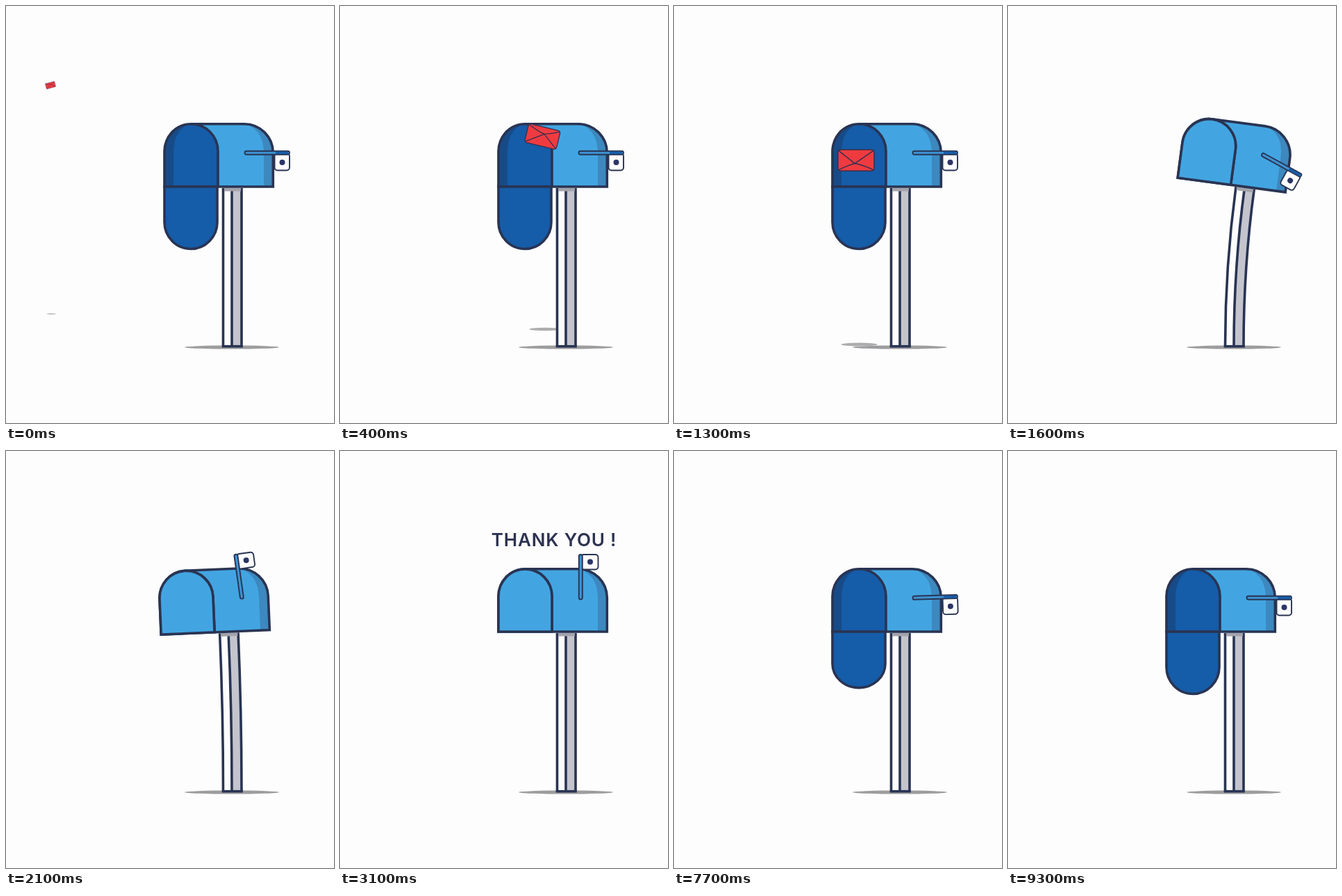
An HTML page that plays this animation: 472 px wide and 600 px high, repeating every 10000 ms.

```html
<!DOCTYPE html>
<html lang="en">
<head>
<meta charset="utf-8">
<title>Mailbox</title>
<style>
  html, body { margin: 0; width: 100%; height: 100%; overflow: hidden; background: #fdfdfd; }
  svg { display: block; width: 472px; height: 600px; }
  .line { stroke: #293453; stroke-width: 3.6; }
  .thin { stroke: #33304f; stroke-width: 2.2; stroke-linejoin: round; stroke-linecap: round; }
  text { font: 600 26px Inter, "Open Sans", sans-serif; fill: #2d3350; letter-spacing: .8px; }
</style>
</head>
<body>
<svg viewBox="0 0 472 600" fill="none">
  <ellipse cx="325" cy="491" rx="68" ry="2.6" fill="#9d9d9f"/>
  <ellipse id="shade" fill="#adadaf"/>

  <path id="white" fill="#fdfdfd"/>
  <path id="grey" fill="#c4c4cd"/>
  <path id="edges" class="line"/>
  <path class="line" d="M310.7 489.7H340.8"/>

  <text id="thanks" x="308" y="137" text-anchor="middle">THANK YOU !</text>

  <g id="box">
    <path d="M314 264H338" stroke="#a3a3ac" stroke-width="5"/>
    <path d="M228 260V209A38.5 39.5 0 0 1 266 169.7H343A41.5 41.5 0 0 1 384.3 211V260Z" fill="#42a5e1"/>
    <path d="M346 170A39 41 0 0 1 383 211V259H371V212Q371 180 346 170Z" fill="#3c88bf"/>
    <path d="M228 260V209A38.5 39.5 0 0 1 305 209V260Z" fill="#155ca9"/>
    <path d="M228 260V209Q229 171 266 169Q241 177 241 212V260Z" fill="#174b88"/>
    <path class="line" d="M228 260V209A38.5 39.5 0 0 1 266 169.7H343A41.5 41.5 0 0 1 384.3 211V260Z"/>
    <path class="line" d="M266 169.7A38.5 39.5 0 0 1 305 209V260"/>
    <path id="door" class="line"/>
    <g id="flag">
      <rect x="347" y="149" width="24.5" height="21.5" rx="4" fill="#fdfdfd" stroke="#293453" stroke-width="1.9"/>
      <circle cx="360" cy="159.5" r="4" fill="#2b3566"/>
      <rect x="343.8" y="149" width="5" height="64.5" rx="2.5" fill="#3d93d2" stroke="#293453" stroke-width="1.9"/>
      <path id="tip" d="M346.3 151V169" stroke="#155ca9" stroke-width="3.4"/>
    </g>
  </g>

  <g id="letter">
    <rect class="thin" x="-40" y="-23.5" width="80" height="47" rx="6" fill="#ef3b40"/>
    <path class="thin" d="M-38 -21Q-14 -10 3 -7Q18 -11 38 -21M-38 21L3 -7L38 21"/>
  </g>
</svg>

<script>
const LOOP = 10000, STEP = 100;
const HIT = 1300, RAISE = 1600, THANK = 2200, RESET = 7000, DROP = 7100;

const el = id => document.getElementById(id);
const set = (id, attrs) => {
  for (const k in attrs) el(id).setAttribute(k, attrs[k]);
};
const ramp = (t, from, to) => Math.min(1, Math.max(0, (t - from) / (to - from)));
const mix = (a, b, u) => a + (b - a) * u;

// Swing that starts at 1 and dies out within a second
const swing = (t, from, power) => {
  const u = ramp(t, from, from + 1000);
  return (1 - u) ** power * Math.cos(2 * Math.PI * u / .75);
};

const bezier = (p, u) => [0, 1].map(k => {
  const v = 1 - u;
  return v ** 3 * p[0][k] + 3 * v * v * u * p[1][k] + 3 * v * u * u * p[2][k] + u ** 3 * p[3][k];
});

// The letter approaches on the right, then loops round the left into the box
const approach = [[64, 114], [200, 120], [430, 225], [377, 354]];
const loopIn = [[377, 354], [290, 470], [-275, 200], [262, 222]];

function lean(t) {
  const u = ramp(t, HIT, HIT + 1600) * 1.6;
  return u < 1.6 ? 28 * Math.exp(-u / .5) * Math.sin(2 * Math.PI * u / 1.2) : 0;
}

function doorSide(t) {
  return t < DROP ? 1 - 2 * ramp(t, HIT, HIT + 200) : 1 - 2 * Math.abs(swing(t, DROP, 2));
}

function flagTurn(t) {
  const rest = t < DROP ? swing(t, RAISE, 3) : 1 - swing(t, DROP, 3);
  return 90 * rest + 1.37 * lean(t) * (1 - ramp(t, RAISE, RAISE + 300));
}

function drawPost(d, angle) {
  const top = x => {
    const r = x - 325;
    return `${325 + d + r * Math.cos(angle)} ${262 + r * Math.sin(angle)}`;
  };
  const up = x => `M${x} 490Q${x} 375 ${top(x)}`;
  const strip = (a, b) => `${up(a)}L${top(b)}Q${b} 375 ${b} 490Z`;
  set("white", { d: strip(312, 325) });
  set("grey", { d: strip(325, 339) });
  set("edges", { d: up(312.5) + up(325) + up(339) });
}

function drawBox(t) {
  const d = lean(t), angle = Math.atan(d / 115);
  drawPost(d, angle);
  set("box", { transform: `translate(${d} 0) rotate(${angle * 180 / Math.PI} 325 260)` });

  const s = doorSide(t), y = 260 + 51 * s, open = s > 0 ? 1 : 0;
  set("door", {
    d: `M228 260V${y}A38 ${38.5 * Math.abs(s)} 0 0 ${1 - open} ${305 - open} ${y}V260Z`,
    fill: open ? "#155ca9" : "#42a5e1"
  });

  const turn = flagTurn(t);
  set("flag", { transform: `rotate(${turn} 346 211)` });
  set("tip", { opacity: turn > 45 ? 1 : 0 });
}

function drawLetter(t) {
  const visibility = t <= HIT ? "visible" : "hidden";
  const u = ramp(t, 0, 800), v = ramp(t, 800, HIT), arc = Math.sin(Math.PI * v);
  const [x, y] = v ? bezier(loopIn, v) : bezier(approach, u);
  const s = mix(.17, 1, u) + .12 * arc - .35 * v * v;
  const angle = mix(-15, 42.5, u) + 137.5 * v;
  set("letter", { visibility, transform: `translate(${x} ${y}) rotate(${angle}) scale(${s})` });
  set("shade", { visibility, cx: x + 7 * s, cy: mix(443, 487, u) + 9 * arc, rx: 40 * s, ry: 3.8 * s });
}

function draw(t) {
  drawBox(t);
  drawLetter(t);
  const shown = ramp(t, THANK, THANK + 500) - ramp(t, RESET, RESET + 400);
  set("thanks", { opacity: shown, transform: `translate(0 ${8 * (1 - shown)})` });
}

const start = performance.now();
function frame() {
  const t = (performance.now() - start) % LOOP;
  draw(Math.floor(t / STEP) * STEP);
  requestAnimationFrame(frame);
}
frame();
</script>
</body>
</html>
```
